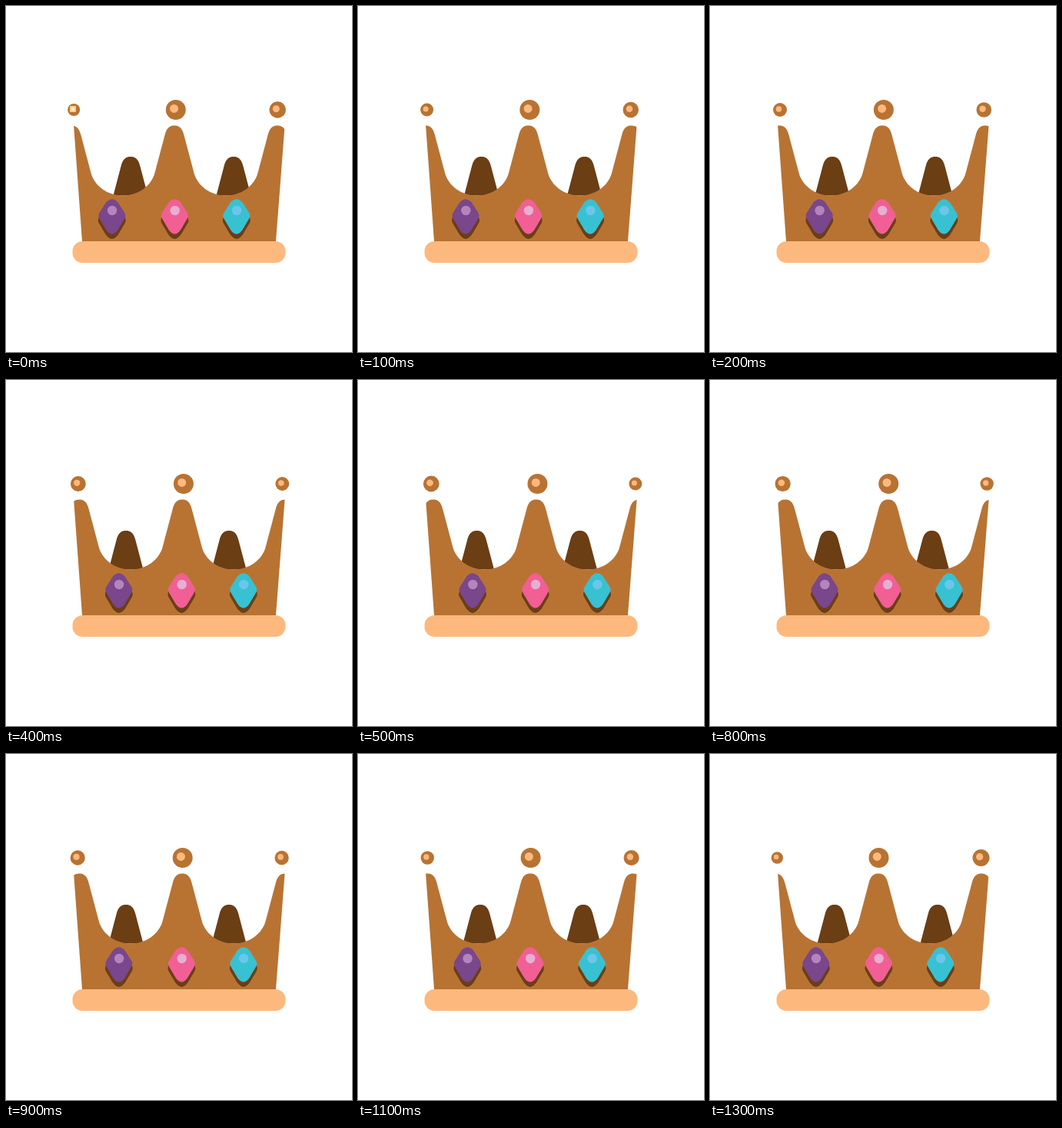
Animation of 450x450 px, one loop 1400 ms. Source, as an HTML page:

```html
<!DOCTYPE html>
<html lang="en">
<head>
<meta charset="utf-8">
<title>Turning crown</title>
<style>
  html, body { margin: 0; width: 100%; height: 100%; overflow: hidden; background: #fff; }
  svg { display: block; width: 100%; height: 100%; }
</style>
</head>
<body>
<svg viewBox="0 0 450 450">
  <defs>
    <clipPath id="front"><path d="M87.7 150H363L351 306H99Z"/></clipPath>
  </defs>
  <g id="back" fill="#6b3e14"></g>
  <g clip-path="url(#front)"><path id="body" fill="#b87333"/></g>
  <g id="gems"></g>
  <rect x="86.5" y="306" width="277" height="28" rx="13" fill="#fdb97d"/>
  <g id="balls"></g>
</svg>
<script>
const STEP = 100, COUNT = 14, PITCH = 134;
const COPPER = '#b87333', DARK = '#6b3e14', LIGHT = '#fdb97d';
const $ = id => document.getElementById(id);

function add(parent, tag, attrs) {
  const el = document.createElementNS('http://www.w3.org/2000/svg', tag);
  for (const k in attrs) el.setAttribute(k, attrs[k]);
  return parent.appendChild(el);
}
const shift = (el, x) => el.setAttribute('transform', `translate(${x} 0)`);

// One spike, then the hollow to its right, drawn from the spike's axis.
const spike = 'c2.5 -10 7 -12.4 12.5 -12.4s10 2.4 12.5 12.4';
const hollow = 'l13 49c4.5 17 21.5 29.5 41.5 29.5s37 -12.5 41.5 -29.5l13 -49';
$('body').setAttribute('d',
  `M${-PITCH - 12.5} 168${spike}${hollow}${spike}${hollow}${spike}L170 310H-170Z`);

for (const x of [0, PITCH])
  add($('back'), 'path', { d: `M${x - 12.5} 208.5${spike}l10 38h-45Z` });

const gemPath = 'M-7.5 255Q0 247.4 7.5 255L15.5 267.5Q19.5 272.7 15.5 278' +
  'L7.5 291.5Q0 301.5 -7.5 291.5L-15.5 278Q-19.5 272.7 -15.5 267.5Z';
const gems = [
  [137.8, '#7a468c', '#b584bb'],
  [219.4, '#f15f95', '#e6b0d2'],
  [299.8, '#38c1d2', '#6cc6ea']
].map(([x, fill, shine]) => {
  const el = add($('gems'), 'g', {});
  add(el, 'path', { d: gemPath, fill: DARK, stroke: DARK, transform: 'translate(0 6)' });
  add(el, 'path', { d: gemPath, fill });
  add(el, 'circle', { cx: 0.3, cy: 266, r: 6.2, fill: shine });
  return { el, x };
});

// Position and radius at steps 0, 6, 7 and 13.
const KEYS = [0, 6, 7, 13];
const balls = [
  { x: [88.2, 96.7, 96.1, 87.4], r: [8, 10.9, 10.6, 7.7] },
  { x: [220.8, 236, 234.8, 219.5], r: [13, 13, 13, 13] },
  { x: [353.2, 362.4, 361.7, 352.5], r: [10.7, 8, 8.2, 11] }
];
for (const b of balls) {
  b.disc = add($('balls'), 'circle', { fill: COPPER });
  b.shine = add($('balls'), 'circle', { fill: LIGHT });
}
const glint = add($('balls'), 'g', {});
add(glint, 'rect', { x: 83, y: 130, width: 8, height: 8, fill: '#fccf82' });
add(glint, 'rect', { x: 85, y: 132, width: 4, height: 4, fill: '#fff3d2' });

function lerp(vals, n) {
  const k = n < 6 ? 0 : n < 7 ? 1 : 2;
  return vals[k] + (vals[k + 1] - vals[k]) * (n - KEYS[k]) / (KEYS[k + 1] - KEYS[k]);
}
function circle(el, cx, cy, r) {
  el.setAttribute('cx', cx);
  el.setAttribute('cy', cy);
  el.setAttribute('r', r);
}

function draw(n) {
  const turn = n < 7 ? n : 13 - n;
  shift($('body'), 219 + 2.55 * turn);
  shift($('back'), 162 - 1.5 * turn);
  for (const g of gems) shift(g.el, g.x + 2.25 * turn);
  for (const b of balls) {
    const x = lerp(b.x, n), r = lerp(b.r, n);
    circle(b.disc, x, 135, r);
    circle(b.shine, x - 0.17 * r, 135 - 0.12 * r, 0.42 * r);
  }
  glint.setAttribute('visibility', n ? 'hidden' : 'visible');
}

const start = performance.now();
function tick(now) {
  draw(Math.floor(Math.max(0, now - start) / STEP) % COUNT);
  requestAnimationFrame(tick);
}
draw(0);
requestAnimationFrame(tick);
</script>
</body>
</html>
```
